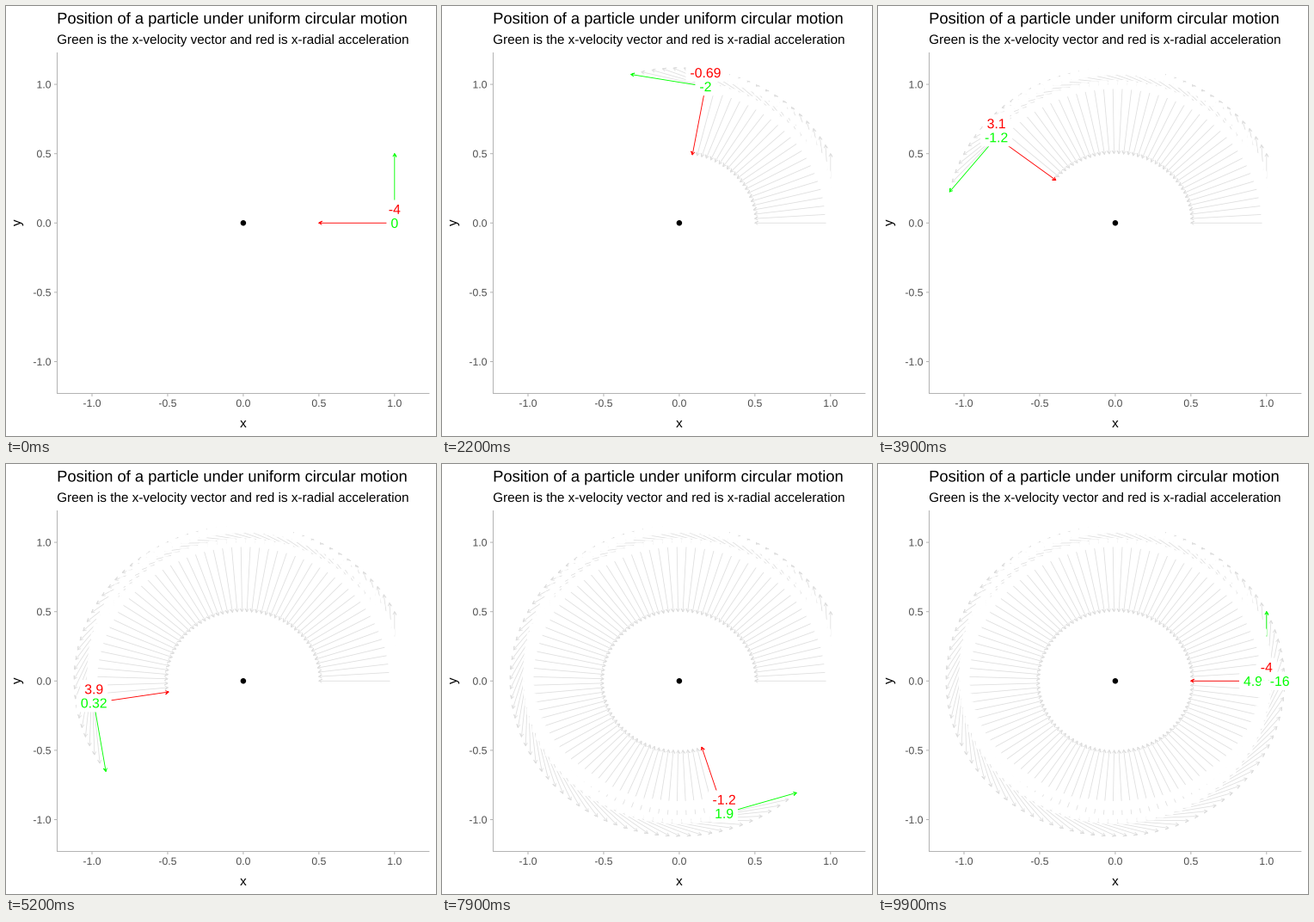
A matplotlib script for the animation above (10 s loop, 500x500 px).

```python
import numpy as np
import matplotlib.pyplot as plt
from matplotlib.animation import FuncAnimation
from matplotlib.collections import LineCollection, PolyCollection
from matplotlib.patches import Circle, PathPatch
from matplotlib.textpath import TextPath
from matplotlib.transforms import Affine2D

plt.rcParams["font.family"] = "Liberation Sans"

SIZE, DPI, FRAMES = 500, 100, 100
PX = 72 / DPI                       # points per pixel
CX, CY, SX, SY = 275.9, 252.3, 175.9, 161.2
FONT, TINY, PAD = 15.8, 1.0, 5.0    # label text, trail label text, label padding
GREEN, RED, TRAIL = "#00ff00", "#ff0000", "#dedede"
NUDGE = 0.1 * SY

fig = plt.figure(figsize=(SIZE / DPI, SIZE / DPI), dpi=DPI, facecolor="white")
ax = fig.add_axes([0, 0, 1, 1])
ax.set_xlim(0, SIZE)
ax.set_ylim(SIZE, 0)
ax.axis("off")


def to_px(x, y):
    return np.array([CX + SX * x, CY - SY * y])


def text_width(s):
    """Advance of a number or a single x or y, in em."""
    return sum({".": 0.278, "-": 0.333, "x": 0.5, "y": 0.5}.get(c, 0.556) for c in s)


def glyphs(x, y, s, px, align=0.0, turn=0):
    """Outline of a text with its baseline at y; align 0 left, 0.5 centre, 1 right."""
    start = -align * text_width(s) * px if align else 0
    place = Affine2D().scale(1, -1).rotate_deg(-turn).translate(x, y)
    return place.transform_path(TextPath((start, 0), s, size=px))


def write(*args, color="black", **kw):
    ax.add_patch(PathPatch(glyphs(*args, **kw), fc=color, lw=0, snap=False))


def rule(xs, ys):
    ax.plot(xs, ys, color="#b3b3b3", lw=1 * PX, solid_capstyle="butt", snap=False)


def arrow(tail, tip, length=4.0, angle=np.radians(30)):
    """Line with an open head, as one polyline."""
    back = np.arctan2(*(tail - tip)[::-1])
    barbs = [tip + length * np.array([np.cos(back + s), np.sin(back + s)])
             for s in (-angle, angle)]
    return np.array([tail, tip, barbs[0], tip, barbs[1]])


def label_box(center, s, px, radius=3.0):
    w = text_width(s) * px / 2 + PAD - radius
    h = 0.716 * px / 2 + PAD - radius
    a = np.radians(np.arange(4)[:, None] * 90 + np.linspace(0, 90, 6)).ravel()
    sx = np.repeat([1, -1, -1, 1], 6)
    sy = np.repeat([1, 1, -1, -1], 6)
    return np.column_stack([center[0] + sx * w + radius * np.cos(a),
                            center[1] + sy * h + radius * np.sin(a)])


class Vector:
    """Arrows and value labels of one quantity, with the trail behind them."""

    def __init__(self, color, tips, values, shift, z):
        self.values = [f"{v + 0.0:.2g}" for v in values]
        self.spots = [p - (0, shift) for p in places]
        self.arrows = [arrow(p, t) for p, t in zip(places, tips)]
        self.small = [label_box(c, s, TINY) for c, s in zip(self.spots, self.values)]
        self.large = [label_box(c, s, FONT) for c, s in zip(self.spots, self.values)]
        self.trail = self.lines(TRAIL, 0.8, z)
        self.line = self.lines(color, 0.9, z + 0.1)
        self.masks = self.boxes(z + 10)
        self.box = self.boxes(z + 10.1)
        self.text = ax.add_patch(PathPatch(glyphs(0, 0, "0", FONT), fc=color, lw=0,
                                           snap=False, zorder=z + 10.2))

    @staticmethod
    def lines(color, width, z):
        return ax.add_collection(LineCollection(
            [], colors=color, linewidths=width * PX, capstyle="butt",
            joinstyle="round", zorder=z), autolim=False)

    @staticmethod
    def boxes(z):
        return ax.add_collection(PolyCollection(
            [], facecolors="white", edgecolors="none", zorder=z), autolim=False)

    def show(self, i):
        self.trail.set_segments(self.arrows[:i])
        self.line.set_segments([self.arrows[i]])
        self.masks.set_verts(self.small[:i])
        self.box.set_verts([self.large[i]])
        x, y = self.spots[i]
        self.text.set_path(glyphs(x, y + 0.358 * FONT, self.values[i], FONT, align=0.5))


# Titles and axes
write(59.2, 20.5, "Position of a particle under uniform circular motion", 18.33)
write(59.2, 44, "Green is the x-velocity vector and red is x-radial acceleration", 15.28)
write(CX, 490, "x", 15.28, align=0.5)
write(17, CY, "y", 15.28, align=0.5, turn=90)
rule([59.5, 59.5], [54, 451])
rule([59, 492.4], [450.5, 450.5])
for v in np.linspace(-1, 1, 5):
    x, y = to_px(v, v)
    rule([x, x], [451, 454])
    rule([56, 59], [y, y])
    write(x, 466, f"{v:.1f}", 12.22, color="#4d4d4d", align=0.5)
    write(52.5, y + 4.4, f"{v:.1f}", 12.22, color="#4d4d4d", align=1)
ax.add_patch(Circle((CX, CY), 3.25, fc="black", lw=0))

# Motion: x = cos t, y = sin t at angular speed 2
theta = np.linspace(0, 2 * np.pi, FRAMES)
c, s = np.cos(theta), np.sin(theta)
places = to_px(c, s).T
velocity = Vector(GREEN, to_px(c - s / 2, s + c / 2).T, -2 * s, 0, 3)
radial = Vector(RED, to_px(c / 2, s / 2).T, -4 * c, NUDGE, 4)


def update(i):
    velocity.show(i)
    radial.show(i)
    return []


anim = FuncAnimation(fig, update, frames=FRAMES, init_func=lambda: update(0),
                     interval=100, repeat=True, repeat_delay=0, blit=False)
plt.show()
```
